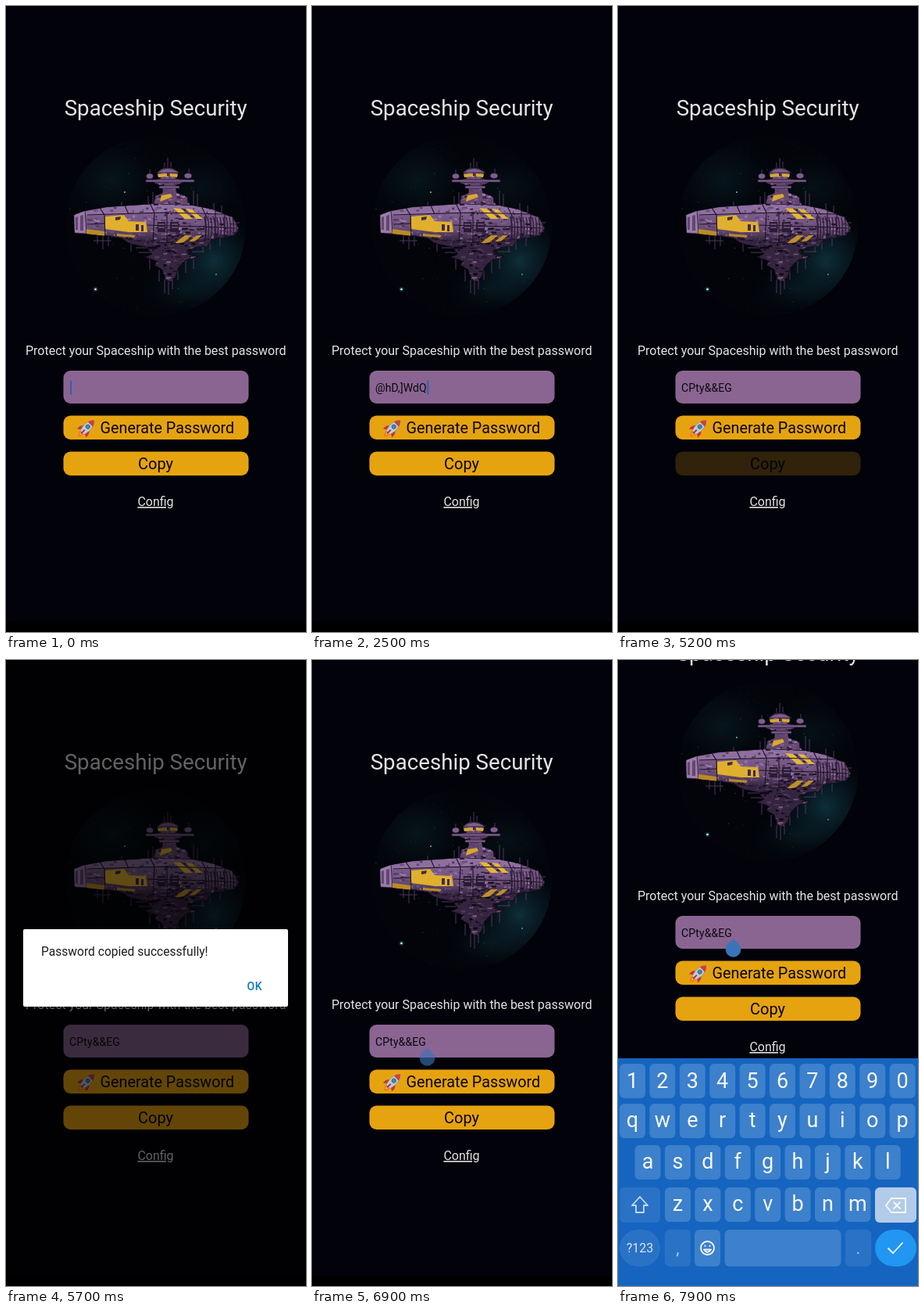
Write an HTML page that moves like this. It is 384 px wide and 800 px high and loops after 8000 ms.

```html
<!DOCTYPE html>
<html lang="en">
<head>
<meta charset="utf-8">
<title>Spaceship Security</title>
<style>
html, body { margin: 0; width: 100%; height: 100%; overflow: hidden; background: #02020a; }
svg { display: block; width: 100vw; height: 100vh; }
text { font-family: Roboto, "Open Sans", sans-serif; fill: #e4e4e6; white-space: pre; }
.mid { text-anchor: middle; }
.field text { font-size: 14px; letter-spacing: .1px; fill: #0b080d; }
.caret { fill: #2f62ae; }

/* One 8 s loop: 100 ms = 1.25% */
.loop { animation: 8s linear infinite; }
.step { animation-timing-function: step-end; }
#gen { animation-name: gen; }
#copy { animation-name: copy; }
#page { animation-name: lift; }
#dim { animation-name: dim; }
#dialog { animation-name: dialog; transform-origin: 192px 394px; }
#ripple { animation-name: ripple; }
#handle { animation-name: handle; }
#keys { animation-name: keys; }
#del { animation-name: del; }
#w0 { animation-name: w0; } #w1 { animation-name: w1; }
#w2 { animation-name: w2; } #w3 { animation-name: w3; }
#c1 { animation-name: c1; } #c2 { animation-name: c2; } #c3 { animation-name: c3; }

@keyframes gen {
  0%, 1.1% { opacity: 1 } 3%, 4.9% { opacity: .2 } 8.1%, 23.6% { opacity: 1 }
  25.5%, 26.2% { opacity: .2 } 29.3%, 42.4% { opacity: 1 }
  44.3%, 44.9% { opacity: .2 } 48%, 100% { opacity: 1 }
}
@keyframes copy { 0%, 62.4% { opacity: 1 } 64.3%, 65.2% { opacity: .2 } 68.6%, 100% { opacity: 1 } }
@keyframes w0 { 0% { opacity: 1 } 4.9%, 100% { opacity: 0 } }
@keyframes w1 { 0% { opacity: 0 } 4.9% { opacity: 1 } 26.2%, 100% { opacity: 0 } }
@keyframes w2 { 0% { opacity: 0 } 26.2% { opacity: 1 } 44.9%, 100% { opacity: 0 } }
@keyframes w3 { 0% { opacity: 0 } 44.9%, 100% { opacity: 1 } }
@keyframes c1 { 0% { opacity: 1 } 11.2% { opacity: 0 } 17.45% { opacity: 1 } 23.7%, 100% { opacity: 0 } }
@keyframes c2 { 0% { opacity: 1 } 32.4% { opacity: 0 } 38.7%, 100% { opacity: 1 } }
@keyframes c3 {
  0% { opacity: 1 } 51.2% { opacity: 0 } 57.4% { opacity: 1 } 63.7% { opacity: 0 }
  89.9% { opacity: 1 } 96.2%, 100% { opacity: 0 }
}
@keyframes dim { 0%, 66.2% { opacity: 0 } 69.4%, 78.7% { opacity: .57 } 82%, 100% { opacity: 0 } }
@keyframes dialog {
  0%, 66.2% { opacity: 0; transform: scale(.92); animation-timing-function: ease-out }
  69%, 78.1% { opacity: 1; transform: none }
  80.6%, 100% { opacity: 0; transform: none }
}
@keyframes ripple { 0%, 74.9% { opacity: 0 } 76.2%, 77.5% { opacity: .12 } 80%, 100% { opacity: 0 } }
@keyframes handle { 0%, 85.6% { opacity: 0 } 86.2% { opacity: .6 } 87.5%, 100% { opacity: 1 } }
@keyframes lift { 0% { transform: none } 88.7%, 100% { transform: translateY(-139px) } }
@keyframes keys {
  0%, 87.4% { transform: translateY(291px); animation-timing-function: cubic-bezier(.2, .6, .2, 1) }
  92%, 100% { transform: none }
}
@keyframes del { 0% { opacity: 0 } 98.65%, 100% { opacity: 1 } }
</style>
</head>
<body>
<svg viewBox="0 0 384 800" preserveAspectRatio="none">
  <defs>
    <radialGradient id="haze">
      <stop offset="0" stop-color="#164a58" stop-opacity=".6"/>
      <stop offset=".5" stop-color="#0d2d39" stop-opacity=".4"/>
      <stop offset="1" stop-color="#041018" stop-opacity="0"/>
    </radialGradient>
    <linearGradient id="side" x2="0" y2="1">
      <stop offset="0" stop-color="#866699"/>
      <stop offset=".6" stop-color="#6c4f79"/>
      <stop offset="1" stop-color="#2d1e37"/>
    </linearGradient>
    <clipPath id="disc"><circle cx="191.500" cy="281" r="116"/></clipPath>
    <clipPath id="hullClip"><path id="hull" d="M87 267L101 262 130 257 190 253 240 255 264 260 290 270 298 284 292 293 262 298 220 303 180 301 130 294 88 290Z"/></clipPath>
    <clipPath id="underClip"><path id="under" d="M146 296L264 298 258 306 240 309 233 317 246 320 229 325 221 334 217 346 211 352 204 350 200 337 190 331 194 326 178 321 187 317 179 308 160 304Z"/></clipPath>
    <clipPath id="towerClip"><path id="tower" d="M188 257L191 243 200 239 201 230 190 226 190 222 198 220 193 213 201 207 213 207 221 213 217 220 226 222 226 226 216 230 219 239 232 244 236 257Z"/></clipPath>
  </defs>

  <rect width="384" height="800" fill="#02020a"/>
  <g id="page" class="loop step">
    <text class="mid" x="191.700" y="139.500" font-size="27.700">Spaceship Security</text>

    <g id="art">
      <g clip-path="url(#disc)">
        <circle cx="191.500" cy="281" r="116" fill="#020409"/>
        <ellipse cx="266" cy="326" rx="66" ry="66" fill="url(#haze)"/>
        <ellipse cx="135" cy="222" rx="74" ry="60" fill="url(#haze)" opacity=".4"/>
        <ellipse cx="250" cy="232" rx="66" ry="50" fill="url(#haze)" opacity=".3"/>
        <ellipse cx="228" cy="362" rx="60" ry="36" fill="url(#haze)" opacity=".4"/>
        <g id="stars"></g>
        <circle cx="114.500" cy="362" r="3" fill="#2d7fa5" opacity=".35"/>
        <circle cx="114.500" cy="362" r="1.300" fill="#c8f2ff"/>
        <circle cx="152" cy="238" r=".9" fill="#8cc4d4"/>
        <circle cx="269" cy="343" r="1" fill="#4f8cab"/>
      </g>

      <g stroke="#4d375a" fill="none">
        <path d="M207 207V194M211 206V199M203 207V200M184 216V209M234 215V208M188 253V238M240 254V236M245 256V240M182 254V243"/>
        <path d="M203 350V367M208 351V369M213 350V362M196 337V352M220 338V350M184 322V337M240 320V336M230 325V341"/>
        <path d="M124 293V311M117 293V304M131 294V307M252 300V315M261 299V311M274 297V307M160 303V314M112 300H135M266 261V252M276 264V255M148 256V250"/>
        <path d="M170 315H188M238 314H254M166 309H182M286 277H299M286 288H297"/>
      </g>

      <use href="#under" fill="#35243f" stroke="#130c19"/>
      <g id="underBits" clip-path="url(#underClip)"></g>
      <use href="#tower" fill="#64476f" stroke="#170f1f"/>
      <g id="towerBits" clip-path="url(#towerClip)"></g>
      <g fill="#7d5e8c" stroke="#1d1326" stroke-width=".7">
        <ellipse cx="184" cy="217.500" rx="4.500" ry="3.500"/>
        <ellipse cx="233" cy="217" rx="5" ry="3.500"/>
        <path d="M179 222H241V225H179ZM196 230H222V233H196Z"/>
        <path d="M193 213Q207 202 222 213Z"/>
      </g>
      <path d="M194 215L206 214 206 218 195 219ZM210 214L220 215 219 219 210 218ZM199 242L211 240 213 244 197 250Z" fill="#d9a82e"/>

      <use href="#hull" fill="url(#side)" stroke="#160e1e"/>
      <g clip-path="url(#hullClip)">
        <path d="M101 262L130 257 190 253 240 255 264 260 280 266 200 264 104 268Z" fill="#8e6f9f"/>
        <g id="hullBits"></g>
        <path d="M87 267L101 261 103 291 87 290Z" fill="#9a7baa" stroke="#2a1c35" stroke-width=".8"/>
        <path d="M89 270L92 269V286L89 286ZM95 268L99 267V287L95 287Z" fill="#624670"/>
        <path d="M127 269L151 267 157 275 179 276 181 289 157 289 127 285Z" fill="#e0af2e"/>
        <path d="M103 285L126 288 126 294 103 291ZM142 291L166 293 164 296 142 294Z" fill="#b98b26"/>
        <path d="M214 258L224 259 239 272 229 272ZM230 259L238 260 252 272 244 272Z" fill="#e5b836"/>
        <path d="M216 303L229 293 238 293 225 304ZM233 302L244 293 251 293 240 302Z" fill="#bd9029"/>
        <path d="M140 270L147 269 146 273 140 274ZM166 279H170V287H166ZM173 280H176V288H173Z" fill="#3f2c4b"/>
        <path d="M104 267L200 264 280 266M104 279L127 278M181 280L250 282 294 284M120 258L126 267 127 294M152 255L157 266M184 252L190 264 188 303M206 264V306M250 256L256 268V301M268 260V300M280 267V297" fill="none" stroke="#1a1122" stroke-width="1.100"/>
        <g id="ribs" stroke="#291a33" stroke-width="1.200"></g>
        <path d="M194 276H204V289H194ZM210 276H221V289H210Z" fill="#2a1b35"/>
        <path d="M195 279H203M195 283H203M212 279H220M212 283H220" stroke="#9676a6"/>
      </g>
    </g>

    <text class="mid" x="191.700" y="446" font-size="16">Protect your Spaceship with the best password</text>

    <g class="field">
      <rect x="73.500" y="466" width="237" height="42" rx="9" fill="#8a6592"/>
      <g id="w0" class="loop step"><rect class="caret" x="82" y="478.500" width="2" height="18"/></g>
    </g>

    <g id="gen" class="loop">
      <rect x="73.500" y="523.500" width="237" height="30.500" rx="9" fill="#e6a310"/>
      <text x="120.500" y="546" font-size="19.800" style="fill:#080602">Generate Password</text>
      <g transform="translate(103 539.500) rotate(45)">
        <path d="M-3 7Q-4 12 0 15Q4 12 3 7Z" fill="#f47a1f"/>
        <path d="M-1.500 7Q-2 10 0 12Q2 10 1.500 7Z" fill="#ffe05a"/>
        <path d="M-4-1Q-9 3-8 9L-3 6ZM4-1Q9 3 8 9L3 6Z" fill="#c93434"/>
        <path d="M0-14Q6-8 5 1L3.500 8H-3.500L-5 1Q-6-8 0-14Z" fill="#c3ccd2" stroke="#71828e" stroke-width=".6"/>
        <path d="M0-14Q3.500-11 4.400-7H-4.400Q-3.500-11 0-14Z" fill="#cf3d3d"/>
        <circle cy="-2.500" r="2.500" fill="#2f8fc4" stroke="#4d6270"/>
        <path d="M-1 3H1V10H-1Z" fill="#b52f35"/>
      </g>
    </g>

    <g id="copy" class="loop">
      <rect x="73.500" y="569.500" width="237" height="30.500" rx="9" fill="#e6a310"/>
      <text class="mid" x="191.500" y="592" font-size="20" style="fill:#080602">Copy</text>
    </g>
    <text class="mid" x="191.500" y="639" font-size="16" text-decoration="underline">Config</text>
    <path id="handle" class="loop" d="M147.500 495.500L154.500 502A9.800 9.800 0 1 1 140.500 502Z" fill="#3a74b8"/>
  </g>

  <rect y="787" width="384" height="13" fill="#000"/>
  <rect id="dim" class="loop" width="384" height="800" opacity="0"/>
  <g id="dialog" class="loop">
    <rect x="22" y="344" width="339" height="99" rx="2" fill="#fff"/>
    <text x="45" y="377.500" font-size="15.600" style="fill:#1d1d1f">Password copied successfully!</text>
    <rect id="ripple" class="loop" x="297" y="399" width="45" height="36" rx="3" fill="#000"/>
    <text x="308.500" y="422" font-size="14" font-weight="500" letter-spacing=".6" style="fill:#0b78c4">OK</text>
  </g>

  <g id="keys" class="loop"><rect y="509" width="384" height="291" fill="#1565c0"/></g>
</svg>
<script>
const $ = id => document.getElementById(id);

function add(parent, tag, attrs, label) {
  const el = document.createElementNS("http://www.w3.org/2000/svg", tag);
  for (const k in attrs) el.setAttribute(k, attrs[k]);
  if (label) el.textContent = label;
  parent.appendChild(el);
  return el;
}

let seed = 11;
const rnd = () => (seed = seed * 16807 % 2147483647) / 2147483647;

// Seeded panels scattered over a part of the ship
function panels(id, x, y, w, h, count, tones, size) {
  for (let i = 0; i < count; i++) add($(id), "rect", {
    x: x + rnd() * w, y: y + rnd() * h,
    width: 1 + rnd() * size, height: .7 + rnd() * 2.2,
    fill: tones[rnd() * tones.length | 0]
  });
}
const dark = ["#1c1225", "#33223d", "#563d64"];
const mixed = [...dark, "#7d5d8c", "#9c7cac"];
panels("hullBits", 103, 254, 90, 48, 100, ["#4c365a", "#634872", "#9b7bab", "#7d5e8e"], 6);
panels("hullBits", 186, 252, 110, 55, 260, mixed, 6);
panels("hullBits", 125, 292, 165, 12, 100, dark, 7);
panels("underBits", 140, 296, 128, 56, 240, ["#0c0811", "#1f1428", "#4f3859", "#77597f"], 6);
panels("towerBits", 181, 206, 58, 51, 150, mixed, 5);
for (let x = 254; x < 296; x += 4) add($("ribs"), "path", { d: `M${x} 270Q${x + 3} 284 ${x} 299`, fill: "none" });
for (let i = 0; i < 60; i++) add($("stars"), "circle", {
  cx: 76 + rnd() * 232, cy: 165 + rnd() * 232, r: .3 + rnd() * .35, fill: "#5f98a8", opacity: .2 + rnd() * .4
});

// Generated passwords, each with its caret at the end of the text
["ml)}Eo[}", "@hD,]WdQ", "CPty&&EG"].forEach((word, i) => {
  const g = add(document.querySelector(".field"), "g", { id: "w" + (i + 1), class: "loop step" });
  const t = add(g, "text", { x: 81, y: 492.5 }, word);
  add(g, "rect", {
    id: "c" + (i + 1), class: "caret loop step",
    x: 81.5 + t.getComputedTextLength(), y: 478.5, width: 2, height: 18
  });
});

const pad = $("keys");
function key(x, y, w, label, o = {}) {
  add(pad, "rect", { x, y, width: w, height: o.h || 44, rx: o.r || 6, fill: o.fill || "#3d80cb" });
  if (label) add(pad, "text", {
    class: "mid", x: x + w / 2, y: y + (o.dy || 31), "font-size": o.size || 27,
    style: `fill:${o.ink || "#f4f8fd"}`
  }, label);
}
const row = (chars, x, y, dy) => [...chars].forEach((c, i) => key(x + i * 38.4, y, 33, c, { dy }));
const soft = "#2a72c5", pale = "#a9c8ea";
const icon = (d, stroke) => add(pad, "path", {
  d, fill: "none", stroke, "stroke-width": 1.8, "stroke-linejoin": "round", "stroke-linecap": "round"
});

row("1234567890", 2, 516, 31);
row("qwertyuiop", 2, 567, 30);
row("asdfghjkl", 21.5, 620, 30);
row("zxcvbnm", 60, 674, 30);
key(2, 674, 52, "", { fill: soft, h: 45 });
key(329, 674, 53, "", { fill: soft, h: 45 });
add(pad, "rect", { id: "del", class: "loop step", x: 329, y: 674, width: 53, height: 45, rx: 6, fill: "#b2cbe8" });
key(2, 728, 52, "?123", { fill: soft, h: 47, r: 23.5, size: 16, dy: 29, ink: "#d5e5f6" });
key(60, 728, 33, ",", { fill: soft, h: 47, size: 22, ink: pale });
key(98, 728, 33, "", { h: 47 });
key(136.5, 728, 149, "", { h: 47 });
key(291, 728, 33, ".", { fill: soft, h: 47, size: 22, ink: pale });
key(329, 728, 53, "", { fill: "#2196f3", h: 47, r: 23.5 });
icon("M28 686L38 697H33V706H23V697H18Z", "#c5daf1");
icon("M350 688H368V706H350L343 697ZM353 693L361 701M361 693L353 701", "#f5f9fd");
icon("M106 751.500a8.500 8.500 0 1 0 17 0a8.500 8.500 0 1 0-17 0M110 753.500Q114.500 760 119 753.500ZM111.500 748.500V749M117.500 748.500V749", "#f4f8fd");
icon("M346 752L352 758L364 745", "#fff");
</script>
</body>
</html>
```
